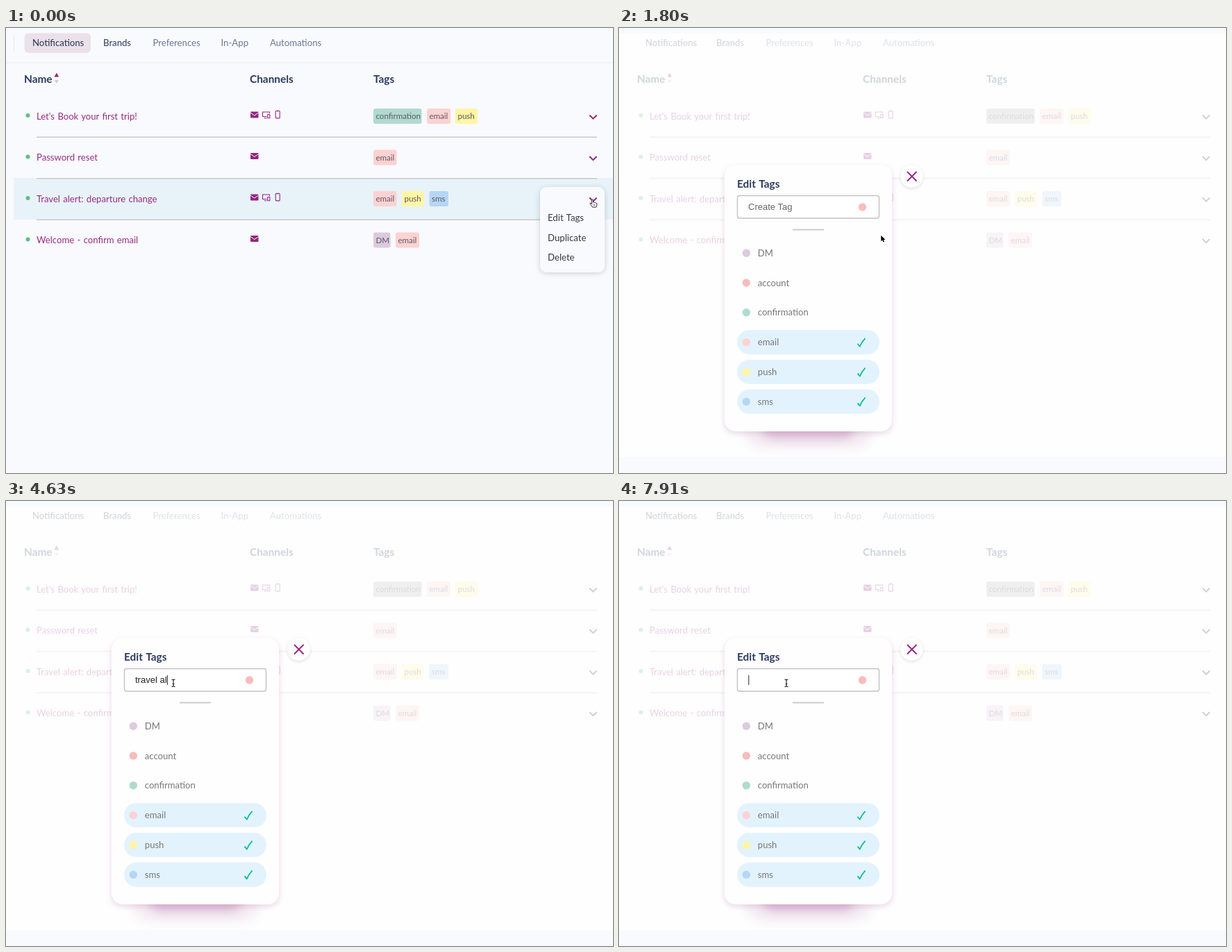
An HTML page for the animation above (8 s loop, 874x641 px).

```html
<!DOCTYPE html>
<html lang="en">
<head>
<meta charset="utf-8">
<title>Edit tags</title>
<style>
  html, body { margin: 0; width: 100%; height: 100%; overflow: hidden; background: #f9fafd; }
  svg { display: block; width: 874px; height: 641px; font: 13.2px Lato, sans-serif; word-spacing: 1px; }
  .head { font-size: 15.4px; font-weight: 700; fill: #2b3a5e; }
  .name { font-size: 13.1px; fill: #962b82; }
  .tag { font-size: 11.6px; fill: #5f5a60; }
  .icon { fill: none; stroke: #94257f; stroke-width: 1.1; }
  .chevron { fill: none; stroke: #94257f; stroke-width: 1.9; }
  .rule { stroke: #c8c9ce; stroke-width: 1.4; }
  .field { font: 13px "Liberation Sans", Arial, sans-serif; word-spacing: 0; }
  .item { font-size: 13.1px; fill: #777; }
  .dim { opacity: .21; }
  .dim .chevron { stroke: #222; }
  .dim .rule { stroke: #ccc; stroke-width: 2; }
  .dim .confirmation { fill: #b8b8ba; }
  .dim .bare { display: none; }
  #sheet { display: none; }
  .dim + #sheet { display: inline; }
</style>
</head>
<body>
<svg viewBox="0 0 874 641">
  <rect id="veil" y="8" width="874" height="610" fill="#fefefe"/>
  <g id="page"></g>
  <g id="sheet">
    <rect x="150" y="199" width="245" height="387" rx="18" fill="#b672a8" opacity=".18" style="filter:blur(3px)"/>
    <rect x="180" y="540" width="186" height="66" rx="28" fill="#b672a8" opacity=".12" style="filter:blur(7px)"/>
    <rect x="204" y="540" width="138" height="50" rx="20" fill="#b672a8" opacity=".45" style="filter:blur(8px)"/>
    <circle cx="421.5" cy="215" r="16.5" fill="#000" opacity=".12" style="filter:blur(2px)"/>
    <circle cx="421.5" cy="213.5" r="16.5" fill="#fefefe"/>
    <path d="M415.5 207.500l12.500 12.500m0-12.500l-12.500 12.500" stroke="#94257f" stroke-width="1.9" stroke-linecap="round"/>
    <rect x="152" y="197" width="241" height="384" rx="16" fill="#fefefe"/>
    <text class="head" x="170" y="229.5">Edit Tags</text>
    <rect x="170.5" y="241.5" width="204" height="32.5" rx="3" fill="#fff" stroke="#c2c2c4" stroke-width="1.4"/>
    <circle cx="350.5" cy="258" r="5.7" fill="#f9bcbc"/>
    <path d="M250 290.5h45" stroke="#cdcdcf" stroke-width="1.8"/>
    <text id="entry" class="field" x="186" y="262.4"></text>
    <rect id="caret" y="251" width="1" height="14" fill="#222"/>
    <g id="items"></g>
  </g>
  <g id="cursor"></g>
</svg>
<script>
const $ = id => document.getElementById(id);
const tones = { DM: '#dccade', account: '#f9bcbc', confirmation: '#b0dad1', email: '#fdd2d2', push: '#fef6a4', sms: '#b5d6f5' };
const text = (x, y, s, cls = '', fill) =>
  `<text x="${x}" y="${y}" class="${cls}"${fill ? ` fill="${fill}"` : ''}>${s}</text>`;

const icons = {
  mail: '<rect x="352" y="-6" width="11.5" height="9" rx="1" fill="#94257f"/><path d="M352-4.5l5.75 4 5.75-4" fill="none" stroke="#f9fafd"/>',
  screen: '<path class="icon" d="M375.500 1h-6v-6.500h10v2M371.500 3.300h4M376.800-2h3v5.300h-3z"/>',
  phone: '<rect class="icon" x="388.2" y="-7.2" width="6" height="10.6" rx="1.2"/><path class="icon" d="M390.2-6.6h2"/>'
};
const chevron = y => `<path class="chevron" d="M840.2 ${y - 2.3}l5.200 5.200 5.200-5.200"/>`;

// [name, icons, tags as label, left, width]
const rows = [
  ["Let's Book your first trip!", 'mail screen phone', [['confirmation', 529, 69.5], ['email', 606, 34], ['push', 647, 32]]],
  ['Password reset', 'mail', [['email', 529, 33.5]]],
  ['Travel alert: departure change', 'mail screen phone', [['email', 529, 33.5], ['push', 570, 31.5], ['sms', 609.5, 27.5]]],
  ['Welcome - confirm email', 'mail', [['DM', 529, 24.5], ['email', 561, 34]]]
];

function row([name, kinds, tags], i) {
  const y = 127 + 59.5 * i;
  return `<circle cx="31.5" cy="${y - 1}" r="3" fill="#5cc184"/>` +
    text(44, y + 4.6, name, 'name') +
    `<g transform="translate(0 ${y - .5})">${kinds.split(' ').map(k => icons[k]).join('')}</g>` +
    tags.map(([label, x, w]) =>
      `<rect class="${label}" x="${x}" y="${y - 11}" width="${w}" height="22" rx="3" fill="${tones[label]}"/>` +
      text(x + 3.4, y + 4, label, 'tag')).join('') +
    chevron(y + .8) +
    (i < 3 ? `<path class="rule" d="M44 ${y + 30.2}h807"/>` : '');
}

$('page').innerHTML =
  `<g class="bare">
    <path d="M0 50h874M11.5 9v25" stroke="#e9ebf0"/>
    <rect x="26.5" y="7.5" width="95.5" height="28.5" rx="6" fill="#ebe1eb"/>
    <rect x="11" y="216" width="863" height="60" fill="#e8f3f9"/>
  </g>` +
  [['Notifications', 38, '#2b3350'], ['Brands', 140, '#2b3a5e'], ['Preferences', 211.5, '#6b7797'],
   ['In-App', 309.5, '#6b7797'], ['Automations', 380, '#6b7797']].map(([s, x, c]) => text(x, 26.3, s, '', c)).join('') +
  text(26, 78.5, 'Name', 'head') + text(351, 78.5, 'Channels', 'head') + text(529, 78.5, 'Tags', 'head') +
  '<path d="M69.5 70.5h6.6l-3.3-6z" fill="#94257f"/><path d="M69.8 75h6l-3 4.7z" fill="#cbcdd3"/>' +
  rows.map(row).join('') +
  `<g class="bare">
    <rect x="769" y="231" width="93" height="122" rx="9" opacity=".18" style="filter:blur(4px)"/>
    <rect x="769" y="229" width="93" height="123" rx="9" fill="#f9fafd"/>
    <rect id="hover" x="769" y="259.5" width="93" height="28.5" fill="#e8f3f9"/>
    ${chevron(246.8)}
    ${['Edit Tags', 'Duplicate', 'Delete'].map((s, i) => text(780, 278 + 28.5 * i, s, '', '#38393f')).join('')}
  </g>`;

$('items').innerHTML = Object.keys(tones).map((label, i) => {
  const y = 324.2 + 42.8 * i;
  return (i > 2
    ? `<rect x="170" y="${y - 17.6}" width="205" height="35.2" rx="17.6" fill="#e3f3fd"/>
       <path d="M343.5 ${y + 2.2}l3.300 4q2.500-6.500 7.800-12" fill="none" stroke="#0bbf8f" stroke-width="1.8" stroke-linejoin="round"/>`
    : '') +
    `<circle cx="183.3" cy="${y}" r="5.7" fill="${tones[label]}"/>` + text(199.8, y + 4.6, label, 'item');
}).join('');

const shapes = {
  hand: '<g transform="scale(.88)"><path d="M-1 1q0-1.400 1.100-1.400T1.200 1v3.200q1.800-.6 2.300.6 1.600-.4 2 .7 1.700-.1 1.700 1.500 0 2.600-1.400 5.300H0Q-2 9.400-4 6.600q-.3-1.300 1-1.200L-1 7z" fill="#fff" stroke="#111"/><path d="M1.500 7.500v2.500m2-2.500v2.500" stroke="#111" stroke-width=".7"/></g>',
  arrow: '<path transform="scale(.84)" d="M0 0v10.200l2.300-2.100 1.600 3.600 1.800-.8-1.600-3.500h3.200z" stroke="#fff" stroke-width="1.200" paint-order="stroke"/>',
  beam: '<path d="M-2.500-5q2 0 2.500 1 .5-1 2.500-1M0-4V4.500M-2.500 5.500q2 0 2.500-1 .5 1 2.500 1M-1.300 1.500h2.600" fill="none" stroke="#111" stroke-width="1.100"/>'
};
const moves = [
  [0, 'hand', 844.5, 247.3], [300, 'hand', 836, 260], [450, 'hand', 826.5, 271], [900, 'arrow', 827, 272.2],
  [1650, 'arrow', 640, 284], [1800, 'arrow', 377.3, 298.7], [1950, 'arrow', 300, 281],
  [2100, 'beam', 258, 267], [2250, 'beam', 244, 263], [2390, 'beam', 241, 262]
];
// [time, typed text, caret shown]
const typing = [
  [0, '', 0], [2540, '', 1], [2990, '', 0], [3590, 'tr', 1], [3730, 'tra', 1], [3880, 'trav', 1], [4030, 'trave', 1],
  [4180, 'travel', 1], [4480, 'travel a', 1], [4630, 'travel al', 1], [4780, 'travel ale', 1], [4920, 'travel aler', 1],
  [5220, 'travel alert', 1], [5660, 'travel alert', 0], [6260, 'travel alert', 1], [6710, 'travel alert', 0],
  [7160, 'travel alert', 1], [7760, 'travel alert', 0], [7910, '', 1]
];
const at = (list, t) => list.findLast(e => e[0] <= t);

function draw(now) {
  const t = now % 8000, open = t >= 1500, entering = t < 1650;
  $('page').setAttribute('class', open ? 'dim' : '');
  $('veil').style.display = open ? '' : 'none';
  $('hover').style.display = t >= 1350 ? '' : 'none';
  $('sheet').setAttribute('transform', `translate(0 ${entering ? 3 : 0})`);
  $('sheet').setAttribute('opacity', entering ? .86 : 1);

  const [, typed, caret] = at(typing, t), empty = t < 2540;
  $('entry').textContent = empty ? 'Create Tag' : typed;
  $('entry').setAttribute('fill', empty ? '#666' : '#222');
  $('caret').setAttribute('x', 186.3 + (typed ? $('entry').getComputedTextLength() : 0));
  $('caret').setAttribute('opacity', caret);

  const [, shape, x, y] = at(moves, t);
  $('cursor').innerHTML = shapes[shape];
  $('cursor').setAttribute('transform', `translate(${x} ${y})`);
}

const start = performance.now();
(function loop() {
  draw(performance.now() - start);
  requestAnimationFrame(loop);
})();
</script>
</body>
</html>
```
